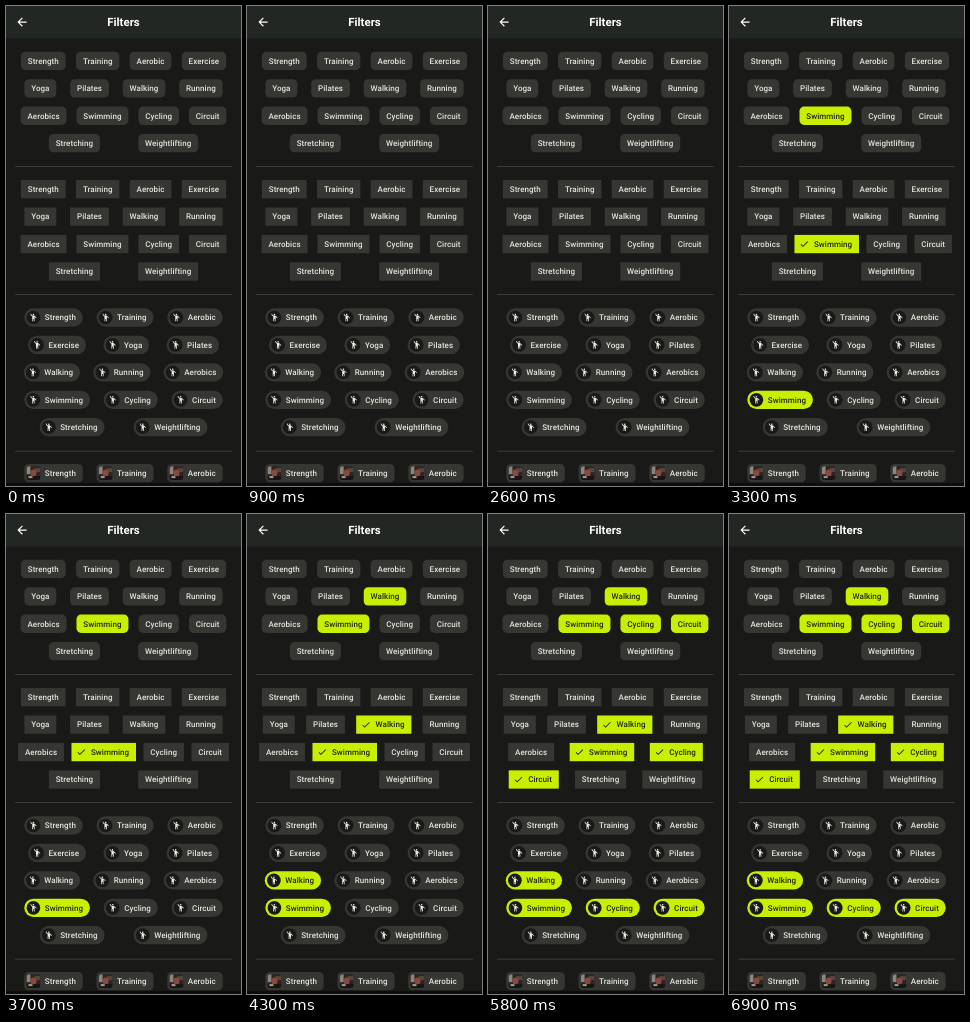
An HTML page that plays this animation: 235 px wide and 480 px high, repeating every 7000 ms.

```html
<!DOCTYPE html>
<html lang="en">
<head>
<meta charset="utf-8">
<title>Filters</title>
<style>
html, body { margin: 0; width: 100%; height: 100%; overflow: hidden; background: #191918; }
svg { display: block; width: 235px; height: 480px; }
text { font-family: Roboto, sans-serif; text-rendering: geometricPrecision; }
.chip text { font-size: 8px; font-weight: 500; letter-spacing: .057px; fill: #e5e4dc; }
.chip .body { fill: #363732; }
.chip .mark { display: none; }
.chip.on .body { fill: #c9ee00; }
.chip.on text { fill: #21270a; }
.chip.on .mark { display: inline; }
</style>
</head>
<body>
<svg id="stage" viewBox="0 0 235 480" xmlns="http://www.w3.org/2000/svg">
  <defs>
    <path id="check" d="M9 16.17 4.83 12l-1.42 1.41L9 19 21 7l-1.41-1.41z"/>
    <g id="person">
      <circle cx="12" cy="4" r="2"/>
      <path d="M15.89 8.11C15.5 7.72 14.83 7 13.53 7h-2.54C8.24 6.99 6 4.75 6 2H4c0 3.16 2.11 5.84 5 6.71V22h2v-6h2v6h2V10.05L18.95 14l1.41-1.41z"/>
    </g>
    <clipPath id="frame"><rect x="-6.86" y="-6.86" width="13.72" height="13.72" rx="3"/></clipPath>
    <g id="photo" clip-path="url(#frame)">
      <rect x="-7" y="-7" width="14" height="14" fill="#2b2422"/>
      <rect x="-7" y="-7" width="4" height="8" fill="#8d857f"/>
      <rect x="1" y="-5" width="6" height="4" fill="#59443d"/>
      <ellipse cx="0" cy="0" rx="3" ry="3.6" fill="#8a4a3b"/>
      <rect x="-7" y="3" width="14" height="4" fill="#171514"/>
      <rect x="-5" y="3" width="4" height="2" fill="#a49a94"/>
    </g>
  </defs>
  <rect width="235" height="480" fill="#191918"/>
  <rect width="235" height="32.5" fill="#232724"/>
  <path transform="translate(9.14 9.2) scale(.5714)" fill="#fff" d="M20 11H7.83l5.59-5.59L12 4l-8 8 8 8 1.41-1.41L7.83 13H20z"/>
  <text x="117.5" y="20.3" text-anchor="middle" font-size="11.43" font-weight="700" fill="#fff">Filters</text>
  <g id="chips"></g>
  <rect y="477" width="235" height="3" fill="#0d0d0c"/>
</svg>
<script>
const LOOP = 7000;
const DP = 235 / 411.25;
const LEFT = 16 * DP, ROOM = 235 - 2 * LEFT;
const GAP = 8 * DP, PITCH = 48 * DP, HIGH = 32 * DP;
const LABELS = ['Strength', 'Training', 'Aerobic', 'Exercise', 'Yoga', 'Pilates', 'Walking',
  'Running', 'Aerobics', 'Swimming', 'Cycling', 'Circuit', 'Stretching', 'Weightlifting'];

// label: [selected at, cleared at]
const PICKS = {
  Training: [1000, 2200],
  Swimming: [3000, LOOP],
  Walking: [3800, LOOP],
  Circuit: [4700, LOOP],
  Cycling: [5800, LOOP]
};

// y: centre of the first row; lead: space before the label, plain and selected
const SECTIONS = [
  { y: 54.9, lead: [12, 12], radius: 8 * DP },
  { y: 183.2, lead: [12, 34], radius: 0, icon: 'check' },
  { y: 311.5, lead: [36, 36], radius: HIGH / 2, icon: 'person' },
  { y: 467.1, lead: [36, 36], radius: 8 * DP, icon: 'photo', count: 3 }
];

const root = document.getElementById('chips');

function add(parent, tag, attrs) {
  const el = document.createElementNS('http://www.w3.org/2000/svg', tag);
  for (const key in attrs) el.setAttribute(key, attrs[key]);
  return parent.appendChild(el);
}

function addIcon(parent, id, x, size, fill, cls = '') {
  const k = size * DP / 24;
  const at = `translate(${x - 12 * k} ${-12 * k}) scale(${k})`;
  add(parent, 'use', { href: '#' + id, transform: at, fill, class: cls });
}

function makeChip(label, section) {
  const g = add(root, 'g', { class: 'chip' });
  const body = add(g, 'rect', { class: 'body', y: -HIGH / 2, height: HIGH, rx: section.radius });
  const mid = 16 * DP;
  if (section.icon === 'check') addIcon(g, 'check', 17 * DP, 18, '#21270a', 'mark');
  if (section.icon === 'person') {
    add(g, 'circle', { cx: mid, r: 12 * DP, fill: '#191a17' });
    addIcon(g, 'person', mid, 16, '#f2f1ea');
  }
  if (section.icon === 'photo') {
    add(g, 'use', { href: '#photo', x: mid });
    add(g, 'rect', { class: 'mark', x: mid - 6.86, y: -6.86, width: 13.72, height: 13.72,
      rx: 3, fill: '#171a08', 'fill-opacity': .82 });
    addIcon(g, 'check', mid, 20, '#c9ee00', 'mark');
  }
  const text = add(g, 'text', { y: 2.85 });
  text.textContent = label;
  return { label, g, body, text, size: text.getComputedTextLength() };
}

for (const s of SECTIONS) s.chips = LABELS.slice(0, s.count).map(label => makeChip(label, s));
for (const y of [160.1, 288.3, 444.8]) {
  add(root, 'rect', { x: LEFT, y, width: ROOM, height: .7, fill: '#4b4c47' });
}

function isOn(label, t) {
  const span = PICKS[label];
  return !!span && t >= span[0] && t < span[1];
}

// Wrap chips into rows, then share the free space evenly.
function layout(section, t) {
  const rows = [];
  let row = null, used = 0;
  for (const chip of section.chips) {
    chip.on = isOn(chip.label, t);
    chip.lead = section.lead[+chip.on] * DP;
    chip.width = chip.lead + chip.size + 12 * DP;
    if (!row || used + GAP + chip.width > ROOM + .6) {
      rows.push(row = []);
      used = -GAP;
    }
    row.push(chip);
    used += GAP + chip.width;
    row.used = used;
  }
  rows.forEach((chips, i) => {
    const free = (ROOM - chips.used) / (chips.length + 1);
    let x = LEFT + free;
    for (const c of chips) {
      c.g.setAttribute('transform', `translate(${x} ${section.y + i * PITCH})`);
      c.g.classList.toggle('on', c.on);
      c.body.setAttribute('width', c.width);
      c.text.setAttribute('x', c.lead);
      x += c.width + GAP + free;
    }
  });
}

let shown = null;
function render(t) {
  const state = LABELS.filter(label => isOn(label, t)).join();
  if (state === shown) return;
  shown = state;
  for (const s of SECTIONS) layout(s, t);
}

const start = performance.now();
function tick() {
  render((performance.now() - start) % LOOP);
  requestAnimationFrame(tick);
}
tick();
</script>
</body>
</html>
```
